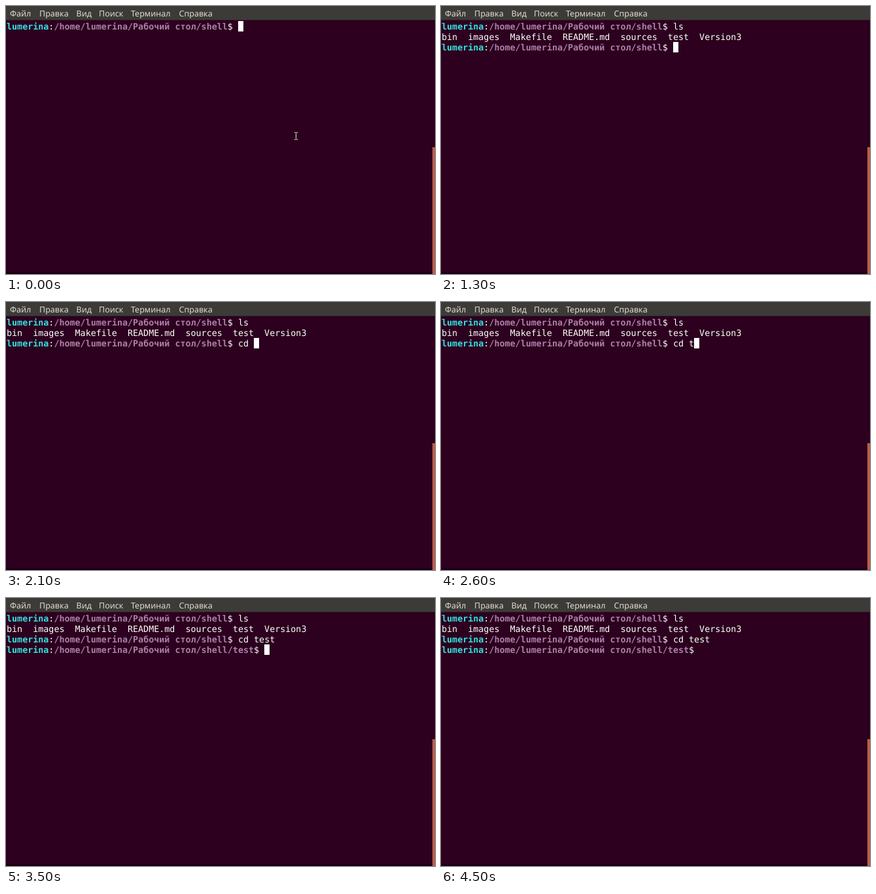
Animation of 656x410 px, one loop 4.6 s. Source, as an HTML page:

```html
<!DOCTYPE html>
<html lang="ru">
<head>
<meta charset="utf-8">
<title>Терминал</title>
<style>
  html, body { margin: 0; width: 100%; height: 100%; overflow: hidden; background: #2c001e; }
  svg { display: block; width: 656px; height: 410px; }
  text { white-space: pre; text-rendering: geometricPrecision; }
  #menu { font: 12.5px "Noto Sans", "Open Sans", sans-serif; fill: #dfdbd2; }
  #rows { font: 13.36px "DejaVu Sans Mono", monospace; fill: #fff; }
  .user { font-weight: bold; fill: #34e2e2; }
  .path { font-weight: bold; fill: #ad7fa8; }
</style>
</head>
<body>
<svg viewBox="0 0 656 410">
  <rect width="656" height="410" fill="#2c001e"/>
  <rect width="656" height="21.5" fill="#3c3b37"/>
  <rect y="407" width="652" height="3" fill="#1c0013"/>
  <rect x="652" y="216" width="4" height="194" fill="#bd5c4c"/>
  <g id="menu"></g>
  <g id="rows"></g>
  <rect id="cursor" width="8" height="16" fill="#fff"/>
  <path id="pointer" d="M441 193.5h2M444 193.5h2M443.5 194v10M441 204.5h2M444 204.5h2" stroke="#e4dce2" fill="none"/>
</svg>
<script>
const LOOP = 4600, CELL = 8.043, ROW = 16;
const USER = 'lumerina';
const HOME = `/home/${USER}/Рабочий стол/shell`;
const $ = id => document.getElementById(id);

function add(parent, tag, attrs, text = '') {
  const el = document.createElementNS('http://www.w3.org/2000/svg', tag);
  for (const key in attrs) el.setAttribute(key, attrs[key]);
  el.textContent = text;
  return parent.appendChild(el);
}

const menu = [['Файл', 6], ['Правка', 51], ['Вид', 107.5], ['Поиск', 142], ['Терминал', 191], ['Справка', 264.5]];
for (const [label, x] of menu) add($('menu'), 'text', { x, y: 16 }, label);

// Each prompt appears at `start`; `keys` are the times of its typed characters.
const prompts = [
  { row: 0, start: 0, path: HOME, command: 'ls', keys: [400, 600] },
  { row: 2, start: 1300, path: HOME, command: 'cd test', keys: [1800, 1900, 2100, 2500, 2700, 2800, 3000] },
  { row: 3, start: 3400, path: HOME + '/test', command: '', keys: [] }
];

const line = row => add($('rows'), 'text', { x: 1, y: 36 + row * ROW });

for (const p of prompts) {
  p.el = line(p.row);
  add(p.el, 'tspan', { class: 'user' }, USER);
  add(p.el, 'tspan', {}, ':');
  add(p.el, 'tspan', { class: 'path' }, p.path);
  add(p.el, 'tspan', {}, '$ ');
  p.input = add(p.el, 'tspan', {});
  p.width = USER.length + p.path.length + 3;
}

const listing = line(1);
listing.textContent = 'bin  images  Makefile  README.md  sources  test  Version3';

const show = (el, on) => el.setAttribute('visibility', on ? 'visible' : 'hidden');

function draw(t) {
  for (const p of prompts) {
    const on = t >= p.start;
    show(p.el, on);
    if (!on) continue;
    const typed = p.keys.filter(k => t >= k).length;
    p.input.textContent = p.command.slice(0, typed);
    $('cursor').setAttribute('x', Math.round(1 + (p.width + typed) * CELL));
    $('cursor').setAttribute('y', 23 + p.row * ROW);
  }
  show(listing, t >= prompts[1].start);
  show($('cursor'), t < 4100);
  show($('pointer'), t < prompts[0].keys[0]);
}

const begin = performance.now();
function tick() {
  draw((performance.now() - begin) % LOOP);
  requestAnimationFrame(tick);
}
tick();
</script>
</body>
</html>
```
